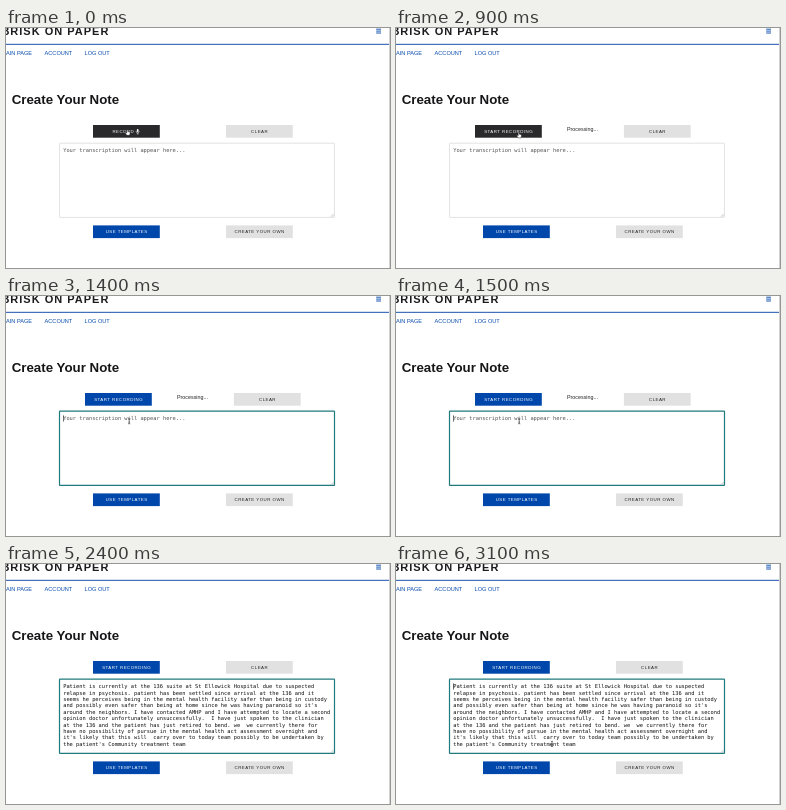
Write an HTML page that moves like this. It is 384 px wide and 240 px high and loops after 3.2 s.

```html
<!DOCTYPE html>
<html lang="en">
<head>
<meta charset="utf-8">
<title>Create Your Note</title>
<style>
  html, body { margin: 0; width: 100%; height: 100%; overflow: hidden; background: #fff; }
  svg { display: block; width: 100vw; height: 100vh; }
  text { font-family: "Liberation Sans", Arial, sans-serif; white-space: pre; }
  .brand { font-size: 11px; font-weight: bold; letter-spacing: 1px; fill: #1c1c1e; }
  .nav { font-size: 5.6px; fill: #0047ab; }
  .title { font-size: 13.3px; font-weight: bold; fill: #161618; }
  .label { font-size: 4.4px; letter-spacing: .46px; }
  .status { font-size: 5.35px; fill: #222; }
  .mono { font-family: "DejaVu Sans Mono", monospace; font-size: 5.35px; }
</style>
</head>
<body>
<svg id="stage" viewBox="0 0 384 240"></svg>
<script>
const LOOP = 3200, STEP = 100;
const BLUE = "#0047ab", DARK = "#29282b", PALE = "#e1e1e1", TEAL = "#217a7c";
const NOTE = [
  "Patient is currently at the 136 suite at St Ellowick Hospital due to suspected",
  "relapse in psychosis. patient has been settled since arrival at the 136 and it",
  "seems he perceives being in the mental health facility safer than being in custody",
  "and possibly even safer than being at home since he was having paranoid so it's",
  "around the neighbors. I have contacted AMHP and I have attempted to locate a second",
  "opinion doctor unfortunately unsuccessfully.  I have just spoken to the clinician",
  "at the 136 and the patient has just retired to bend. we  we currently there for",
  "have no possibility of pursue in the mental health act assessment overnight and",
  "it's likely that this will  carry over to today team possibly to be undertaken by",
  "the patient's Community treatment team"
];
const stage = document.getElementById("stage");

function add(tag, attrs, parent = stage) {
  const node = document.createElementNS("http://www.w3.org/2000/svg", tag);
  set(node, attrs);
  parent.appendChild(node);
  return node;
}
function set(node, attrs) {
  for (const key in attrs) node.setAttribute(key, attrs[key]);
}
function show(node, on) {
  node.setAttribute("visibility", on ? "visible" : "hidden");
}
function write(cls, x, y, content, attrs = {}, parent = stage) {
  const node = add("text", { class: cls, x, y, ...attrs }, parent);
  node.textContent = content;
  return node;
}
function button(x, y, fill, label, color) {
  const group = add("g", { transform: `translate(${x} ${y})` });
  const box = add("rect", { width: 66.8, height: 12.7, fill }, group);
  const text = write("label", 33.6, 8, label, { fill: color, "text-anchor": "middle" }, group);
  return { group, box, text };
}
function place(node, x, y) {
  node.setAttribute("transform", `translate(${x} ${y})`);
}

// Page header
add("rect", { width: 384, height: 240, fill: "#fff" });
write("brand", -4.6, 7.2, "BRISK ON PAPER");
add("path", { d: "M370.2 1.2h4.8M370.2 3.1h4.8M370.2 5h4.8", stroke: BLUE, "stroke-width": 0.9 });
add("rect", { y: 15.8, width: 383, height: 1.1, fill: "#2f62b5" });
write("nav", -4.6, 27, "MAIN PAGE");
write("nav", 38.6, 27, "ACCOUNT");
write("nav", 78.6, 27, "LOG OUT");
write("title", 5.7, 75.6, "Create Your Note");
add("rect", { x: 383, width: 1, height: 240, fill: "#d2d2d2" });

// Controls
const record = button(87, 97, DARK, "", "#fff");
const clear = button(220, 97, PALE, "CLEAR", "#222");
button(87, 197.4, BLUE, "USE TEMPLATES", "#fff");
button(220, 197.4, PALE, "CREATE YOUR OWN", "#222");
const status = write("status", 0, 103, "");
const mic = add("g", { fill: "none", stroke: "#fff", "stroke-width": 0.5 });
add("rect", { x: 130.9, y: 101, width: 1.6, height: 3, rx: 0.8, fill: "#fff", stroke: "none" }, mic);
add("path", { d: "M130.2 102.9v.5a1.5 1.5 0 0 0 3 0v-.5M131.7 104.9v1M130.8 105.9h1.8" }, mic);

// Text area
const area = add("rect", { x: 53.5, y: 115.2, width: 275, height: 74.2, rx: 0.5, fill: "#fff" });
add("path", { d: "M325 188.6l2.6-2.6M326.6 188.6l1-1", stroke: "#777", "stroke-width": 0.4 });
const hint = write("mono", 57.2, 124.2, "Your transcription will appear here...", { fill: "#555" });
const note = add("g", { fill: "#111" });
NOTE.forEach((line, i) => write("mono", 57.2, 124.2 + i * 6.4, line, {}, note));
const caret = add("rect", { x: 57, y: 119.4, width: 0.6, height: 6.2, fill: "#111" });

// Pointers
const hand = add("path", {
  d: "M-.6-2.6q.6-.7 1.1 0v1.6l1.6.4q.7.3.6 1l-.4 2.3h-2.9l-1.5-2.1q-.1-.8.6-.6l.9.5z",
  fill: "#fff", stroke: "#111", "stroke-width": 0.45
});
const beam = add("path", {
  d: "M-1.1-2.7q1 0 1.1.7q.1-.7 1.1-.7M0-2v4M-1.1 2.7q1 0 1.1-.7q.1.7 1.1.7M-.7.9h1.4",
  fill: "none", stroke: "#222", "stroke-width": 0.6
});

function mode(t) {
  if (t < 100) return { label: "RECORD", x: 87, clearX: 220, status: "", statusX: 172 };
  if (t < 900) return { label: "STOP RECORDING", x: 79.8, clearX: 227.2, status: "Recording...", statusX: 172.2 };
  if (t < 2400) return { label: "START RECORDING", x: 79, clearX: 227.9, status: "Processing...", statusX: 171 };
  return { label: "START RECORDING", x: 87, clearX: 220, status: "", statusX: 172 };
}
function ramp(t, from, to) {
  const p = Math.min(1, Math.max(0, (t - from) / (to - from)));
  return p * p * (3 - 2 * p);
}

function draw(now) {
  const t = Math.floor((now % LOOP) / STEP) * STEP;
  const m = mode(t), focused = t >= 1400, done = t >= 2400;

  place(record.group, m.x, 97);
  place(clear.group, m.clearX, 97);
  record.box.setAttribute("fill", focused ? BLUE : DARK);
  record.text.textContent = m.label;
  record.text.setAttribute("x", t < 100 ? 30.3 : 33.6);
  show(mic, t < 100);
  status.textContent = m.status;
  status.setAttribute("x", m.statusX);

  set(area, { stroke: focused ? TEAL : "#dcdcdc", "stroke-width": focused ? 1.2 : 0.8 });
  show(hint, !done);
  show(note, done);
  show(caret, (t >= 1400 && t < 1900) || t >= 2700);

  const slide = ramp(t, 200, 500), drop = ramp(t, 1000, 1300);
  const y = 104.6 + 2.6 * slide + 18 * drop;
  const overArea = y > 115;
  place(hand, 121.4 + 1.4 * slide, y);
  place(beam, done ? 156 : 123.2, done ? 180 : y);
  show(hand, !overArea);
  show(beam, overArea && (!done || t >= 2800));
}

const start = performance.now();
function tick() {
  draw(performance.now() - start);
  requestAnimationFrame(tick);
}
tick();
</script>
</body>
</html>
```
